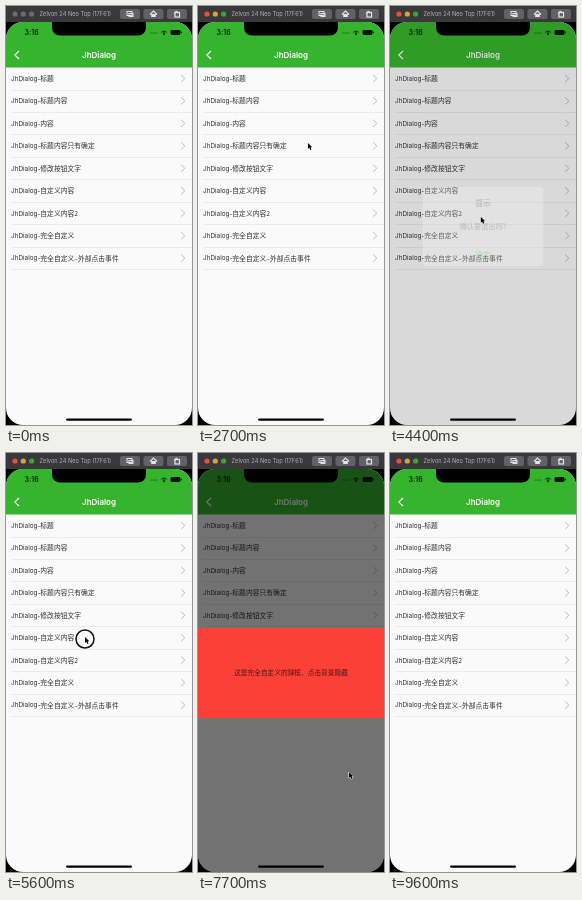
Write an HTML page with a canvas that moves like this. It is 186x419 px and loops after 9.7 s.

```html
<!DOCTYPE html>
<html lang="zh">
<head>
<meta charset="utf-8">
<style>
html, body { margin: 0; width: 100%; height: 100%; overflow: hidden; background: #000; }
canvas { display: block; width: 186px; height: 419px; }
</style>
</head>
<body>
<canvas id="stage"></canvas>
<script>
const W = 186, H = 419, LOOP = 9700, FADE = 200;
const GREEN = '#36b42d', RED = '#fc4038';
const LATIN = 'Inter, Roboto, sans-serif';
const HAN = '"Noto Sans CJK SC", "Noto Sans CJK", sans-serif';
const canvas = document.getElementById('stage');
const ctx = canvas.getContext('2d');
const ratio = window.devicePixelRatio || 1;
canvas.width = W * ratio;
canvas.height = H * ratio;

const rows = ['标题', '标题内容', '内容', '标题内容只有确定', '修改按钮文字',
  '自定义内容', '自定义内容2', '完全自定义', '完全自定义–外部点击事件'];

const ask = '确认要退出吗?';
const pair = ['取消', '确认'];
const dialogs = [
  { open: 400, close: 1300, title: '提示', buttons: pair },
  { open: 2100, close: 2500, title: '提示', text: ask, buttons: pair },
  { open: 2900, close: 3300, text: ask, buttons: pair },
  { open: 3850, close: 4250, title: '提示', text: ask, buttons: ['确定'] },
  { open: 4700, close: 5000, title: '提示', text: ask, buttons: ['再想想', '退出'] },
  { open: 5700, close: 6100, title: '提示', red: true, buttons: pair },
  { open: 6450, close: 6900, title: '提示', red: true, buttons: pair },
  { open: 7400, close: 7800, strip: true },
  { open: 8250, close: 8900, strip: true }
];

// Pointer stops: arrival, departure, x, y
const stops = [
  [0, 150, 97, 73], [250, 500, 97, 73], [800, 1350, 121, 235],
  [1700, 2150, 97, 94], [2320, 2550, 121, 249], [2750, 2950, 108, 117],
  [3120, 3500, 121, 235], [3700, 3900, 90, 140], [4080, 4300, 93, 249],
  [4520, 4750, 88, 162], [4900, 5120, 121, 249], [5300, 5750, 79, 184],
  [5950, 6150, 119, 270], [6300, 6480, 86, 206], [6650, 6950, 119, 270],
  [7200, 7430, 90, 229], [7620, 7850, 151, 319], [8080, 8450, 90, 251],
  [8700, 9700, 146, 284]
];
const taps = [270, 1250, 2010, 2450, 2780, 3250, 3730, 4200, 4560,
  4960, 5560, 6050, 6330, 6850, 7260, 7760, 8120, 8880];

const clamp = v => Math.max(0, Math.min(1, v));
const smooth = v => v * v * (3 - 2 * v);

function rect(x, y, w, h, color) {
  ctx.fillStyle = color;
  ctx.fillRect(x, y, w, h);
}

function round(x, y, w, h, r, color) {
  ctx.beginPath();
  ctx.roundRect(x, y, w, h, r);
  ctx.fillStyle = color;
  ctx.fill();
}

function disc(x, y, r, color) {
  ctx.beginPath();
  ctx.arc(x, y, r, 0, Math.PI * 2);
  ctx.fillStyle = color;
  ctx.fill();
}

function line(points, color, width = 1) {
  ctx.beginPath();
  points.forEach(([x, y]) => ctx.lineTo(x, y));
  ctx.strokeStyle = color;
  ctx.lineWidth = width;
  ctx.stroke();
}

function label(text, x, y, size, color, { family = HAN, weight = 400, align = 'left' } = {}) {
  ctx.font = `${weight} ${size}px ${family}`;
  ctx.textAlign = align;
  ctx.textBaseline = 'alphabetic';
  ctx.fillStyle = color;
  ctx.fillText(text, x, y + size * 0.36);
}

function drawWindowBar(t) {
  rect(0, 0, W, 16, '#39393b');
  const lights = t < 100 ? ['#6b6b6d', '#6b6b6d', '#6b6b6d'] : ['#e4533f', '#d9a53a', '#35a83c'];
  lights.forEach((color, i) => disc(9 + i * 8.3, 8, 2.6, color));
  label('Zelvon 24 Neo Top (17F61)', 33.5, 8, 5.7, '#b4b4b6', { family: LATIN });
  [114, 137.5, 161].forEach(x => round(x, 3, 20, 10, 2, '#626264'));
  const ink = '#e4e4e6';
  ctx.strokeStyle = ink;
  ctx.lineWidth = 1;
  ctx.strokeRect(121, 5.5, 5, 4);
  ctx.strokeRect(123, 7.5, 4, 3);
  line([[144, 8.5], [147.5, 5], [151, 8.5]], ink, 1.2);
  rect(145.2, 8, 4.6, 3, ink);
  ctx.strokeRect(169, 6.5, 4.5, 4.5);
  line([[168, 8], [170, 5], [172, 6]], ink);
}

function drawHeader() {
  rect(0, 16, W, 45.5, GREEN);
  label('3:16', 18.5, 26.5, 7, '#102510', { family: LATIN, weight: 600 });
  for (let i = 0; i < 4; i++) disc(145 + i * 2, 27, 0.6, '#123312');
  ctx.strokeStyle = '#081808';
  ctx.lineWidth = 1;
  [1.6, 3.4].forEach(r => {
    ctx.beginPath();
    ctx.arc(158, 28.5, r, -Math.PI * 0.78, -Math.PI * 0.22);
    ctx.stroke();
  });
  disc(158, 28.4, 0.8, '#081808');
  round(164.5, 24, 10, 5, 1.4, '#081808');
  rect(175, 25.5, 0.8, 2, '#081808');
  line([[13, 45], [8.8, 49], [13, 53]], '#fff', 1.1);
  label('JhDialog', 93, 49, 8, '#fff', { family: LATIN, weight: 600, align: 'center' });
}

function drawList() {
  rows.forEach((name, i) => {
    const y = 72.5 + i * 22.45;
    label('JhDialog-', 5, y, 6.4, '#303030', { family: LATIN });
    label(name, 34.3, y, 6.8, '#303030');
    line([[175.2, y - 3.6], [178.8, y], [175.2, y + 3.6]], '#b5b5b5', 0.9);
    rect(5, Math.round(y + 11), W - 5, 0.6, '#e2e2e2');
  });
}

function drawStrip() {
  rect(0, 175, W, 90, RED);
  label('这是完全自定义的弹框，点击背景隐藏', 93, 220, 6.7, '#4a1512', { align: 'center' });
}

function drawDialog(d) {
  const titleH = d.title ? (d.red || d.text ? 26 : 29) : 0;
  const bodyH = d.red ? 90 : d.text ? (d.title ? 28 : 29) : 0;
  const h = titleH + bodyH + 25;
  const top = Math.round(220 - h / 2);
  const base = top + titleH + bodyH;
  round(33, top, 120.5, h, 4, '#fcfcfc');
  if (d.title) label(d.title, 93, top + 16.5, 7.6, '#222', { weight: 500, align: 'center' });
  if (d.red) rect(33, top + titleH, 120.5, 90, RED);
  if (d.text) label(d.text, 93, base - (d.title ? 15 : 10), 7.2, '#444', { align: 'center' });
  rect(33, base, 120.5, 0.6, '#e0e0e0');
  const single = d.buttons.length === 1;
  if (!single) rect(93, base, 0.6, 25, '#e0e0e0');
  d.buttons.forEach((name, i) => {
    const main = single || i === 1;
    label(name, single ? 93 : 63 + i * 60, base + 14, 7.9, main ? GREEN : '#8c8c8c',
      { weight: main ? 500 : 400, align: 'center' });
  });
}

function drawOverlay(t) {
  for (const d of dialogs) {
    const alpha = Math.min(clamp((t - d.open) / FADE), clamp((d.close + FADE - t) / FADE));
    if (!alpha) continue;
    rect(0, 16, W, H - 16, `rgba(0,0,0,${0.54 * alpha})`);
    ctx.globalAlpha = alpha;
    d.strip ? drawStrip() : drawDialog(d);
    ctx.globalAlpha = 1;
  }
}

function pointerAt(t) {
  let i = 0;
  while (i < stops.length - 1 && t >= stops[i + 1][0]) i++;
  const [, leave, x, y] = stops[i];
  const next = stops[i + 1];
  if (!next || t <= leave) return [x, y];
  const p = smooth((t - leave) / (next[0] - leave));
  return [x + (next[2] - x) * p, y + (next[3] - y) * p];
}

function drawPointer(t) {
  if (t < 150 || t >= 9400) return;
  const [x, y] = pointerAt(t);
  if (taps.some(tap => t >= tap && t < tap + 90)) {
    ctx.beginPath();
    ctx.arc(x, y + 2, 9, 0, Math.PI * 2);
    ctx.strokeStyle = '#111';
    ctx.lineWidth = 1.5;
    ctx.stroke();
  }
  ctx.beginPath();
  [[0, 0], [0, 6], [1.4, 4.8], [2.4, 7], [3.5, 6.5], [2.6, 4.4], [4.3, 4.3]]
    .forEach(([dx, dy]) => ctx.lineTo(x + dx, y + dy));
  ctx.closePath();
  ctx.strokeStyle = '#fff';
  ctx.lineWidth = 1;
  ctx.stroke();
  ctx.fillStyle = '#000';
  ctx.fill();
}

function draw(t) {
  ctx.setTransform(ratio, 0, 0, ratio, 0, 0);
  rect(0, 0, W, H, '#000');
  drawWindowBar(t);
  rect(0, 16, W, H - 16, '#000');
  ctx.save();
  ctx.beginPath();
  ctx.roundRect(0, 16, W, H - 16, 17);
  ctx.clip();
  rect(0, 16, W, H - 16, '#fafafa');
  drawHeader();
  drawList();
  drawOverlay(t);
  round(46, 10, 94, 19.5, 8, '#000');
  round(60, 412.5, 66, 2.2, 1.1, '#000');
  ctx.restore();
  drawPointer(t);
}

function tick() {
  draw(performance.now() % LOOP);
  requestAnimationFrame(tick);
}
tick();
</script>
</body>
</html>
```
